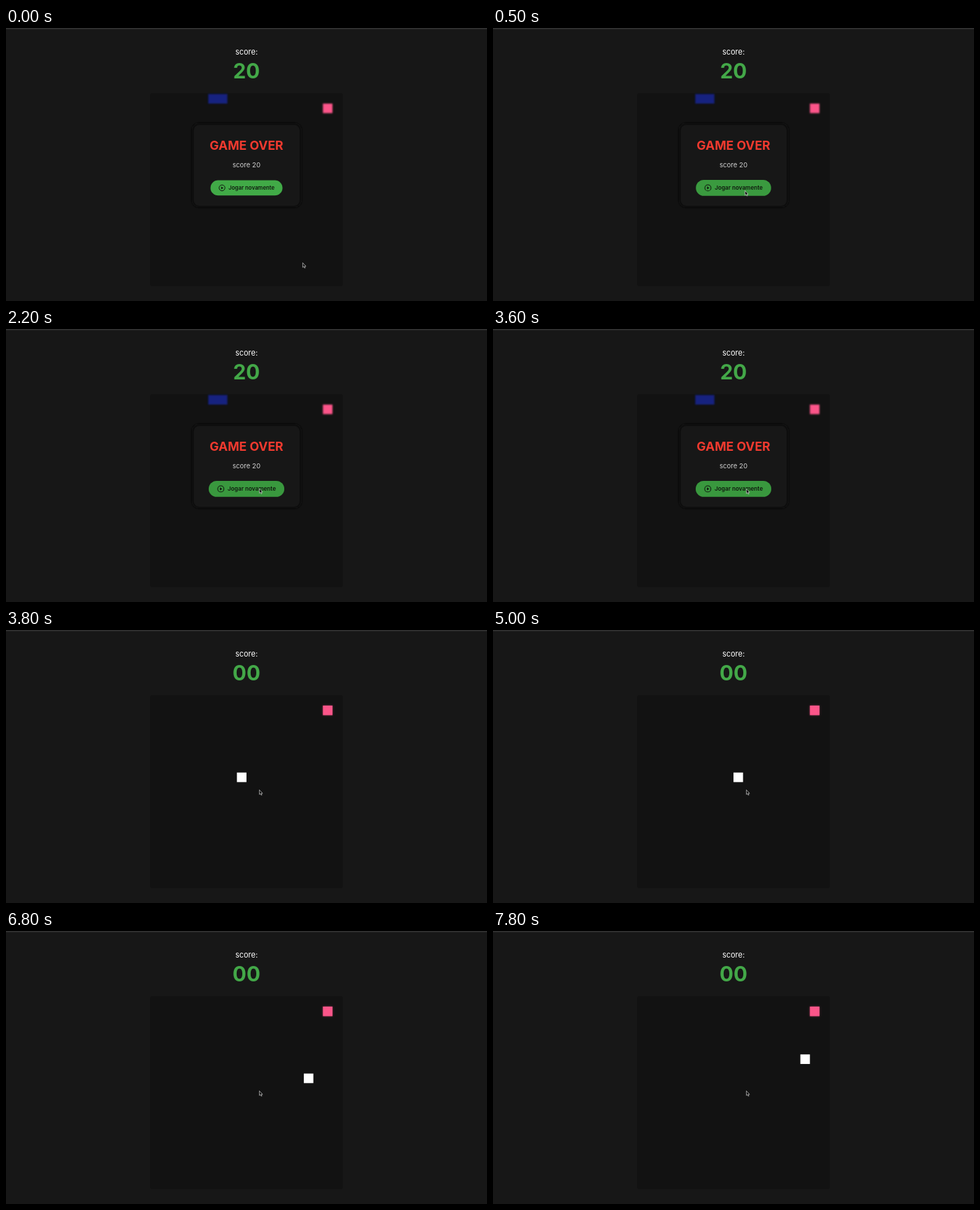
Recreate the animation shown at these times as an HTML page. Size 688x390 px, loop 8 s.

```html
<!DOCTYPE html>
<html lang="pt">
<head>
<meta charset="utf-8">
<title>Game</title>
<style>
  html, body { margin: 0; width: 100%; height: 100%; overflow: hidden; background: #171717; }
  svg { display: block; width: 688px; height: 390px; }
  text { font-family: Inter, "Open Sans", sans-serif; text-anchor: middle; }
</style>
</head>
<body>
<svg viewBox="0 0 688 390">
  <defs>
    <filter id="blur" x="-30%" y="-30%" width="160%" height="160%"><feGaussianBlur stdDeviation="0.8"/></filter>
    <filter id="soft" x="-30%" y="-30%" width="160%" height="160%"><feGaussianBlur stdDeviation="1.4"/></filter>
  </defs>
  <rect width="688" height="390" fill="#171717"/>
  <rect width="688" height="1.6" fill="#343434"/>
  <text x="344" y="38" font-size="11" fill="#fff">score:</text>
  <text id="score" x="344" y="72" font-size="29.5" font-weight="700" fill="#43a848"></text>
  <rect x="206.3" y="93.3" width="275.4" height="275.4" rx="2" fill="#121212"/>

  <rect id="glow" fill="#fb5589" opacity="0.5" filter="url(#soft)"/>
  <rect id="food" fill="#fb5589"/>
  <rect id="head" fill="#fff"/>

  <g id="modal">
    <rect id="body" fill="#15227f" filter="url(#blur)"/>
    <rect x="265.5" y="135.5" width="157.5" height="121" rx="10" fill="#0c0c0c" filter="url(#blur)"/>
    <rect x="268.5" y="138.5" width="151.5" height="115.5" rx="8" fill="#171717"/>
    <text x="344" y="174.3" font-size="17.6" font-weight="700" fill="#f23a2f">GAME OVER</text>
    <text x="344" y="199" font-size="9.6" fill="#d0d0d0">score 20</text>
    <g id="button">
      <rect id="pill" x="292.5" y="217.5" width="103" height="21.8" rx="10.9"/>
      <circle cx="309" cy="228.4" r="4.2" fill="none" stroke="#10190f" stroke-width="1"/>
      <path d="M307.8 226.4L311 228.4L307.8 230.4Z" fill="#10190f"/>
      <text x="351.2" y="231.1" font-size="7.8" font-weight="600" fill="#10190f">Jogar novamente</text>
    </g>
  </g>
  <path id="cursor" d="M0.4 0.4V7L1.9 5.7L3 8L4.1 7.5L3 5.3H5Z" fill="#111" stroke="#e4e4e4" stroke-width="0.6"/>
</svg>
<script>
  const LOOP = 8000, RESTART = 3800, CELL = 13.667, LEFT = 207.3, TOP = 94.3;
  const $ = id => document.getElementById(id);
  const set = (id, attrs) => {
    for (const key in attrs) $(id).setAttribute(key, attrs[key]);
  };
  const place = (id, col, row, cols = 1) => set(id, {
    x: LEFT + col * CELL, y: TOP + row * CELL, width: CELL * cols, height: CELL
  });
  const clamp = v => Math.min(1, Math.max(0, v));
  const ease = v => v * v * (3 - 2 * v);

  // time, x, y of the pointer tip
  const path = [
    [0, 424, 335], [500, 360, 232], [800, 360, 232], [900, 358, 230],
    [1000, 357, 228], [1100, 359, 227], [1600, 359, 227], [1900, 362, 227.5],
    [3400, 362, 227.5], [3600, 362, 228]
  ];
  const rights = [5000, 5300, 5600, 5900, 6200, 6500, 6800, 7200];
  const ups = [7400, 7800];

  function pointer(t) {
    const i = path.findIndex(p => p[0] > t);
    if (i < 0) return path[path.length - 1].slice(1);
    const [t0, x0, y0] = path[i - 1], [t1, x1, y1] = path[i];
    const k = ease((t - t0) / (t1 - t0));
    return [x0 + (x1 - x0) * k, y0 + (y1 - y0) * k];
  }

  function draw(time) {
    const t = Math.floor((time % LOOP) / 100) * 100;
    const playing = t >= RESTART;
    const passed = list => list.filter(s => s <= t).length;

    $("score").textContent = playing ? "00" : "20";
    set("modal", { display: playing ? "none" : "inline" });
    set("head", { display: playing ? "inline" : "none" });
    set("glow", { display: playing ? "inline" : "none" });
    set("food", { filter: playing ? "none" : "url(#blur)" });
    place("head", 9 + passed(rights), 8 - passed(ups));

    const hover = ease(clamp((t - 300) / 250));
    set("button", {
      transform: `translate(344 228.4) scale(${1 + 0.05 * hover}) translate(-344 -228.4)`
    });
    const mix = (a, b) => Math.round(a + (b - a) * hover);
    set("pill", { fill: `rgb(${mix(65, 57)},${mix(170, 152)},${mix(71, 62)})` });
    set("cursor", { transform: `translate(${pointer(t)})` });
  }

  place("food", 18, 1);
  place("glow", 18, 1);
  place("body", 6, 0, 2);

  const start = performance.now();
  function tick() {
    draw(performance.now() - start);
    requestAnimationFrame(tick);
  }
  tick();
</script>
</body>
</html>
```
